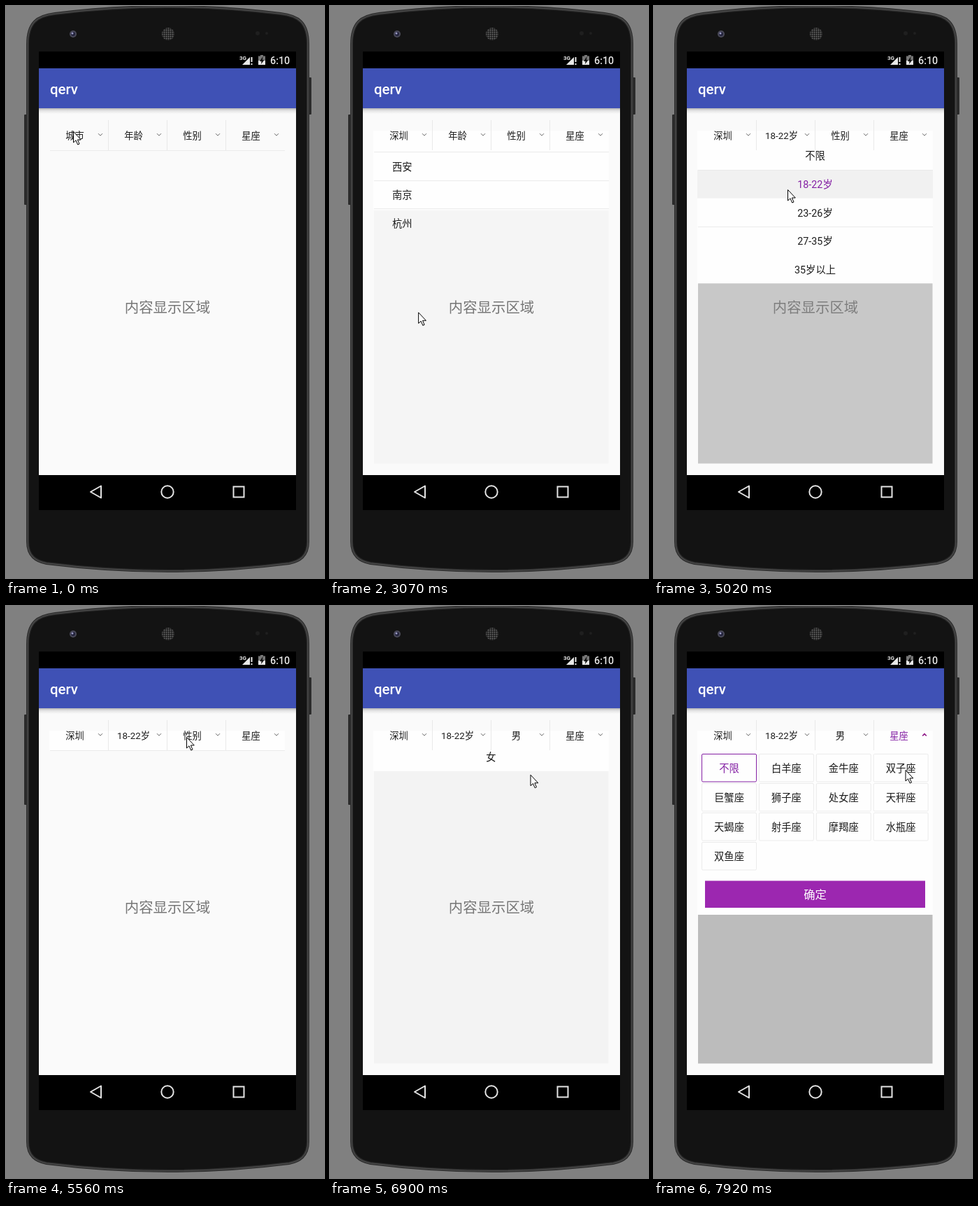
Recreate the animation shown at these times as an HTML page. Size 455x817 px, loop 8 s.

```html
<!DOCTYPE html>
<html lang="zh-CN">
<head>
<meta charset="utf-8">
<title>Drop-down filter</title>
<style>
  html, body { margin: 0; width: 100%; height: 100%; overflow: hidden; background: #808080; }
  svg { display: block; width: 100%; height: 100%; }
  text { font-family: Roboto, "Noto Sans CJK SC", "Noto Sans CJK", "Noto Sans", sans-serif; }
</style>
</head>
<body>
<svg viewBox="0 0 455 817">
  <defs>
    <linearGradient id="shade" x2="0" y2="1">
      <stop stop-color="#b4b4b4"/><stop offset=".4" stop-color="#e2e2e2"/><stop offset="1" stop-color="#fafafa"/>
    </linearGradient>
    <pattern id="mesh" width="3" height="3" patternUnits="userSpaceOnUse">
      <rect width="3" height="3" fill="#1c1c1c"/><circle cx="1.5" cy="1.5" r="1" fill="#6a6a6a"/>
    </pattern>
    <clipPath id="area"><rect x="62" y="206" width="337" height="448"/></clipPath>
    <path id="body" d="M31 55C31 23 45 14 70 11Q150 1 231.500 1Q313 1 393 11C418 14 432 23 432 55V765C432 786 420 793 405 796Q318 807 231.500 807Q145 807 58 796C43 793 31 786 31 765Z"/>
  </defs>

  <!-- phone -->
  <rect width="455" height="817" fill="#808080"/>
  <rect x="26" y="155" width="5" height="129" rx="1" fill="#2b2b2b"/>
  <rect x="432" y="102" width="5" height="53" rx="1" fill="#2b2b2b"/>
  <use href="#body" fill="#131313" stroke="#2c2c2c" stroke-width="4"/>
  <use href="#body" fill="none" stroke="#484848" stroke-width="1.500"/>
  <circle cx="96" cy="40" r="5" fill="#4a4a58"/>
  <circle cx="96" cy="40" r="3" fill="#23233c"/>
  <circle cx="95" cy="39" r="1.500" fill="#9b9bc4"/>
  <circle cx="232" cy="40" r="9" fill="url(#mesh)"/>
  <circle cx="360" cy="39" r="3" fill="#1f1f1f"/>
  <circle cx="373" cy="39" r="2" fill="#1f1f1f"/>

  <!-- screen -->
  <rect x="47" y="65" width="368" height="655"/>
  <g fill="#e8e8e8">
    <text x="334" y="77" font-size="8" font-weight="700">3G</text>
    <path d="M338 84H349V73Z"/>
    <path d="M350.500 73h2v7h-2zM350.500 82h2v2h-2z"/>
    <path d="M361 71.500h3V70h4v1.500h3V84H361Z" fill="#777"/>
    <path d="M361 78H371V84H361Z"/>
    <path d="M367.500 72L363 79h2.500L365 83l4.500-6h-2.500Z" fill="#111"/>
    <text x="378" y="83" font-size="14.300" font-weight="500">6:10</text>
  </g>
  <rect x="47" y="89" width="368" height="581" fill="#fafafa"/>
  <rect x="47" y="89" width="368" height="57" fill="#3f51b5"/>
  <rect x="47" y="146" width="368" height="8" fill="url(#shade)"/>
  <text x="63" y="126" font-size="20.400" font-weight="500" fill="#fff">qerv</text>
  <g fill="none" stroke="#e4e4e4" stroke-width="2">
    <path d="M121 694L136 685.500V702.500Z" stroke-linejoin="round"/>
    <circle cx="231" cy="694" r="8.700"/>
    <rect x="325.500" y="686.500" width="15" height="15"/>
  </g>
  <text x="231" y="437.500" font-size="20.400" text-anchor="middle" fill="#757575">内容显示区域</text>

  <rect id="band" x="62" y="178" width="337" height="28" fill="#fefefe"/>
  <path d="M63 206.500H399" stroke="#ebebeb"/>
  <g id="tabs"></g>
  <rect id="mask" x="63" y="206" width="335.500" height="447.500" fill="#888"/>
  <g id="menus" clip-path="url(#area)"></g>
  <path id="cursor" d="M.5 .5V16L4 12.800L6.700 19L9 18L6.400 12H11.300Z" fill="#fff" stroke="#000"/>
</svg>
<script>
const LOOP = 8000, ROW = 40.55, TOP = 206, INK = '#1c1c1c', PURPLE = '#8420a4';
const $ = id => document.getElementById(id);

function add(parent, tag, attrs, text) {
  const el = document.createElementNS('http://www.w3.org/2000/svg', tag);
  set(el, attrs);
  if (text) el.textContent = text;
  parent.append(el);
  return el;
}
function set(el, attrs) {
  for (const k in attrs) el.setAttribute(k, attrs[k]);
}
// text whose glyphs are vertically centred on y
function label(parent, str, x, y, size, fill, anchor = 'middle') {
  return add(parent, 'text', { x, y: y + size * .38, 'font-size': size, fill, 'text-anchor': anchor }, str);
}

// bursts of screen updates: first, last, count
const BURSTS = [[0, 0, 1], [560, 1560, 8], [1710, 2520, 7], [2920, 3610, 6], [3890, 4710, 7],
  [5020, 5560, 5], [5840, 6350, 5], [6780, 7800, 9], [7920, 7920, 1]];
// cursor path: time, x, y
const PATH = [[0, 96, 179], [750, 96, 179], [1560, 121, 318], [1710, 122, 334], [2520, 119, 468],
  [2990, 119, 468], [3610, 184, 188], [3890, 185, 190], [4027, 189, 212], [4710, 191, 262],
  [5020, 191, 262], [5560, 258, 187], [5840, 258, 188], [5967, 264, 210], [6350, 262, 258],
  [6780, 262, 258], [7290, 360, 189], [7418, 361, 189], [7545, 361, 193], [7800, 360, 230], [7920, 359.5, 234]];

const menus = [
  { name: '城市', open: 520, close: 2880, pick: 6, height: 448, left: true, lines: [0, 1, 2, 3, 4, 5, 6, 7, 8, 9, 10],
    items: '不限 武汉 北京 上海 成都 广州 深圳 重庆 天津 西安 南京 杭州' },
  { name: '年龄', open: 3844, close: 4980, pick: 1, lines: [0, 2], items: '不限 18-22岁 23-26岁 27-35岁 35岁以上' },
  { name: '性别', open: 5750, close: 6740, pick: 1, lines: [], items: '不限 男 女' },
  { name: '星座', open: 7404, close: 1e5, pick: 0, height: 235, grid: true,
    items: '不限 白羊座 金牛座 双子座 巨蟹座 狮子座 处女座 天秤座 天蝎座 射手座 摩羯座 水瓶座 双鱼座' }
];

function buildList(m) {
  if (!m.left) m.mark = add(m.g, 'rect', { x: 62, width: 337, height: ROW, fill: '#f1f1f1' });
  m.rows = m.items.map((s, i) => m.left
    ? label(m.g, s, 89, TOP + 20.6 + i * ROW, 14.3, INK, 'start')
    : label(m.g, s, 230.5, TOP + 20.6 + i * ROW, 14.3, INK));
  for (const i of m.lines) {
    add(m.g, 'rect', { x: 63, y: Math.round(TOP + (i + 1) * ROW) - .5, width: 336, height: 1, fill: '#ebebeb' });
  }
  if (m.left) {
    m.mark = add(m.g, 'path', { d: 'M362.500 20.500l3 3 6-6', fill: 'none', stroke: PURPLE, 'stroke-width': 1.5 });
    m.bar = add(m.g, 'rect', { x: 394, y: TOP, width: 4.5, height: 411, fill: '#b4b4b4' });
  }
}

function buildGrid(m) {
  m.items.forEach((s, i) => {
    const x = 68.5 + i % 4 * 81.9, y = 211.5 + (i >> 2) * 42;
    add(m.g, 'rect', { x, y, width: 78, height: 39.5, rx: 1.5, fill: '#fefefe', stroke: i ? '#ebebeb' : PURPLE });
    label(m.g, s, x + 39, y + 20, 14.3, i ? INK : PURPLE);
  });
  add(m.g, 'rect', { x: 73, y: 392.5, width: 315, height: 38.5, fill: '#9c27b0' });
  label(m.g, '确定', 230.5, 412, 16.35, '#fff');
}

menus.forEach((m, i) => {
  m.items = m.items.split(' ');
  m.height = m.height || m.items.length * ROW;
  m.g = add($('menus'), 'g', {});
  add(m.g, 'rect', { x: 62, y: TOP, width: 337, height: m.height, fill: '#fefefe' });
  (m.grid ? buildGrid : buildList)(m);

  const x = 98.5 + i * 84;
  m.tab = label($('tabs'), m.name, x, 184.5, 13.3, INK);
  m.caret = add($('tabs'), 'path', { transform: `translate(${x + 36.5} 184)`, fill: 'none' });
  if (i) add($('tabs'), 'rect', { x: 62 + i * 84, y: 163, width: 1, height: 43, fill: '#e9e9e9' });
});

const clamp = v => Math.max(0, Math.min(1, v));
const ease = v => .5 - Math.cos(Math.PI * clamp(v)) / 2;
const shown = (m, t) => ease((t - m.open) / 250) * (1 - ease((t - m.close) / 250));

function snap(t) {
  const [from, to, n] = BURSTS.filter(b => b[0] <= t).pop();
  const step = (to - from) / (n - 1) || 1;
  return Math.min(to, from + Math.floor((t - from) / step + .1) * step);
}

function cursorAt(t) {
  const i = PATH.findIndex(k => k[0] > t);
  if (i < 0) return PATH[PATH.length - 1].slice(1);
  const a = PATH[i - 1], b = PATH[i], u = (t - a[0]) / (b[0] - a[0]);
  return [a[1] + (b[1] - a[1]) * u, a[2] + (b[2] - a[2]) * u];
}

function draw(now) {
  const t = snap(now % LOOP);
  let dim = 0;
  for (const m of menus) {
    const p = shown(m, t), done = t >= m.close, active = t >= m.open - 28 && !done;
    dim = Math.max(dim, shown(m, t + 28));
    set(m.g, { transform: `translate(0 ${(p - 1) * m.height})`, visibility: p > 0 ? 'visible' : 'hidden' });
    m.tab.textContent = done ? m.items[m.pick] : m.name;
    set(m.tab, { fill: active ? PURPLE : INK });
    set(m.caret, active
      ? { d: 'M-2.800 1.500L0 -1.300L2.800 1.500', stroke: '#8c1284', 'stroke-width': 1.6 }
      : { d: 'M-3 -1.800L0 1.200L3 -1.800', stroke: '#666', 'stroke-width': 1 });
    if (m.grid) continue;
    const sel = done ? m.pick : 0;
    m.rows.forEach((r, i) => set(r, { fill: i === sel ? PURPLE : INK }));
    set(m.mark, { transform: `translate(0 ${TOP + sel * ROW})` });
    if (m.bar) set(m.bar, { opacity: 1 - clamp((t - 1800) / 250) });
  }
  set($('mask'), { opacity: dim * .533 });
  set($('band'), { opacity: t < 560 ? 0 : 1 });
  set($('cursor'), { transform: `translate(${cursorAt(t)})` });
  requestAnimationFrame(draw);
}
requestAnimationFrame(draw);
</script>
</body>
</html>
```
